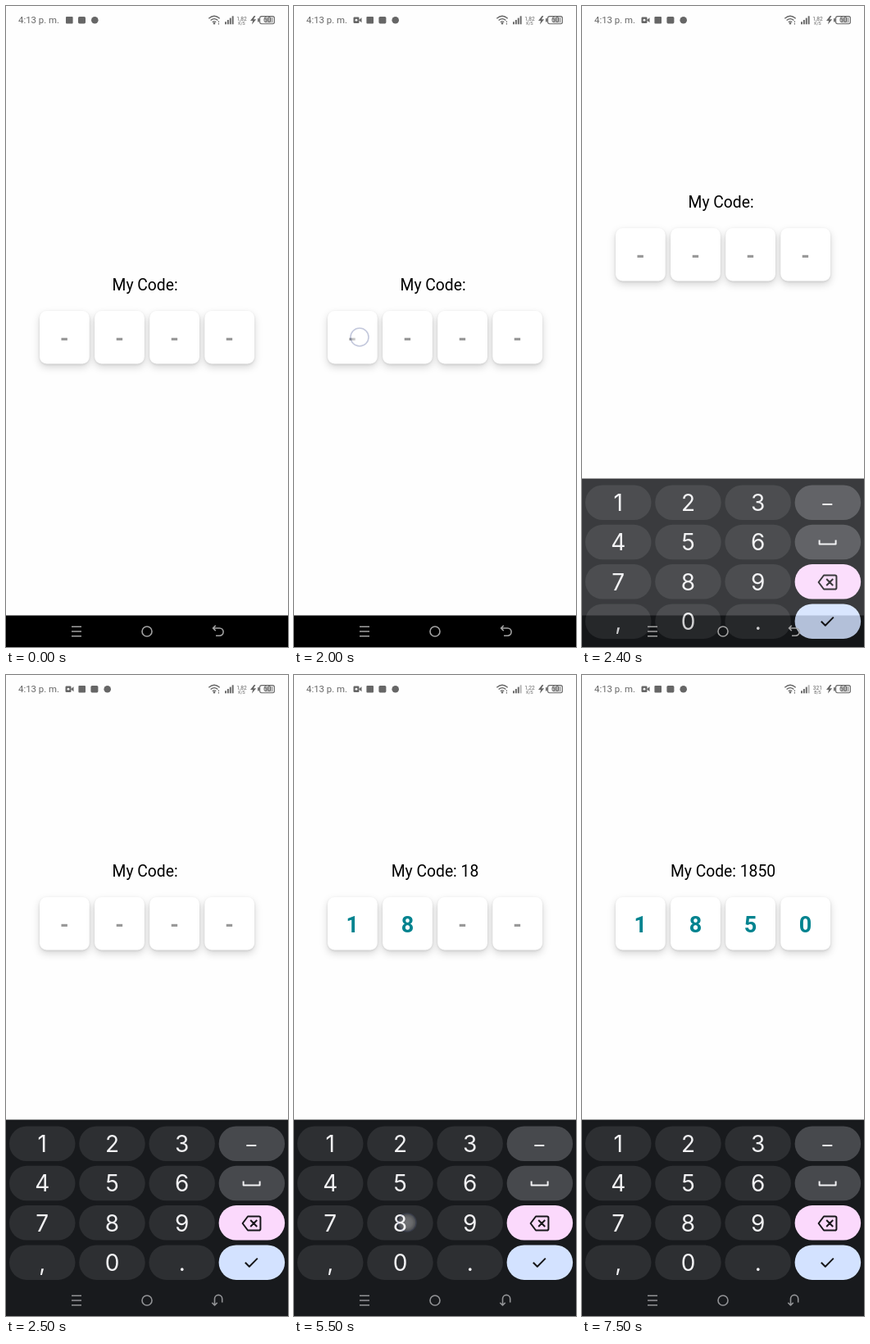
Write an HTML page that moves like this. It is 344 px wide and 782 px high and loops after 8 s.

```html
<!DOCTYPE html>
<html lang="es">
<head>
<meta charset="utf-8">
<title>My Code</title>
<style>
html, body { margin: 0; width: 100%; height: 100%; overflow: hidden; background: #fefefe; }
svg { display: block; width: 100%; height: 100%; }
text { font-family: Roboto, sans-serif; }
.mid { text-anchor: middle; }
.cell { fill: #fff; filter: drop-shadow(0 1px 1.5px rgba(0,0,0,.1)) drop-shadow(0 4px 5px rgba(0,0,0,.16)); }
.digit { font-size: 27px; font-weight: 700; }
.key { font: 400 28px Inter, sans-serif; fill: #f2f2f4; }
.line { fill: none; stroke-linejoin: round; }
</style>
</head>
<body>
<svg id="stage" viewBox="0 0 344 782">
  <defs>
    <radialGradient id="touch">
      <stop offset="0" stop-color="#fff" stop-opacity=".66"/>
      <stop offset=".6" stop-color="#fff" stop-opacity=".55"/>
      <stop offset="1" stop-color="#fff" stop-opacity=".3"/>
    </radialGradient>
  </defs>
  <rect width="344" height="782" fill="#fefefe"/>

  <g fill="#666">
    <text x="15" y="21.3" font-size="11.4">4:13 p. m.</text>
    <g id="camera">
      <rect x="72.5" y="13.5" width="7" height="7.5" rx="1.2"/>
      <path d="M79 17.2 82.5 14.3V20.2Z"/>
      <circle cx="76" cy="17.2" r="1.4" fill="#fefefe"/>
    </g>
    <g id="apps">
      <rect x="73" y="13" width="8.6" height="8.6" rx="1"/>
      <rect x="88" y="13" width="9" height="8.4" rx="1.6"/>
      <circle cx="108.3" cy="17.2" r="4.3"/>
    </g>
    <g class="line" stroke="#666" stroke-width="1.3">
      <path d="M247.3 15.2Q254 9.2 260.7 15.2M249.6 17.6Q254 13.6 258.4 17.6M251.8 19.8Q254 17.9 256.2 19.8"/>
    </g>
    <circle cx="254" cy="21.3" r="1.2"/>
    <path d="M258.8 18.6h1.2v1.4h-1.2zM258.8 21h1.2v1.4h-1.2z"/>
    <g id="signal"></g>
    <text id="speed" class="mid" x="287.4" y="17.6" font-size="6.6"></text>
    <text id="unit" class="mid" x="287.4" y="23" font-size="5.2"></text>
    <path d="M302.6 12 298 18h3l-1 4.6 5.2-6.4h-3.2l2.4-4.2z"/>
    <rect x="307" y="15" width="1.8" height="4.4" rx=".6"/>
    <rect x="309.6" y="12.6" width="17.8" height="9.2" rx="2.2" fill="none" stroke="#666" stroke-width="1.1"/>
    <rect x="316" y="14" width="10" height="6.4" rx="1" fill="#bbb"/>
    <text class="mid" x="318.8" y="20.4" font-size="8.4" font-weight="500">60</text>
  </g>

  <g id="form">
    <text id="label" class="mid" x="172" y="346.8" font-size="19.3"></text>
    <g id="cells"></g>
  </g>

  <rect y="743.5" width="344" height="38.5"/>
  <g id="board"></g>
  <g id="nav" class="line" stroke-width="1.6">
    <path d="M80 757.3h12M80 763h12M80 768.7h12"/>
    <circle cx="172" cy="763" r="6"/>
    <path id="back" d="M-2.5 5.2H2A4.6 4.6 0 0 0 2-4H-5.6M-2.8-7.2-6-4-2.8-.8"/>
  </g>
  <circle id="trace" cx="138" cy="620" r="10" fill="#fff" opacity=".045"/>
  <g id="tap">
    <circle r="10.5" fill="url(#touch)"/>
    <circle r="11" fill="none" stroke="#6a75a8" stroke-opacity=".4" stroke-width="1.6"/>
  </g>
</svg>
<script>
const LOOP = 8000, STEP = 100;
const PIN = [["1", 4600], ["8", 5400], ["5", 5800], ["0", 7100]];
const TAPS = [
  { x: 80, y: 404, from: 2000, fade: 2100, to: 2200 },
  { x: 64, y: 577.5, from: 4500, fade: 4600, to: 4700 },
  { x: 138, y: 668, from: 5300, fade: 5400, to: 5600 },
  { x: 138, y: 620, from: 5700, fade: 5900, to: 6000 },
  { x: 136, y: 715, from: 7000, fade: 7200, to: 7300 }
];
const $ = id => document.getElementById(id);

function add(parent, tag, attrs, text) {
  const el = document.createElementNS("http://www.w3.org/2000/svg", tag);
  for (const k in attrs) el.setAttribute(k, attrs[k]);
  if (text) el.textContent = text;
  return parent.appendChild(el);
}
const set = (id, name, value) => $(id).setAttribute(name, value);

const bars = [3, 5.3, 7.7, 10].map((h, i) =>
  add($("signal"), "rect", { x: 267 + i * 2.9, y: 22.3 - h, width: 1.9, height: h }));

const digits = PIN.map((_, i) => {
  const x = 41 + i * 67.1;
  add($("cells"), "rect", { class: "cell", x, y: 372, width: 60.8, height: 64.6, rx: 8.5 });
  return add($("cells"), "text", { class: "digit mid", x: x + 30.3, y: 415 });
});

function buildBoard() {
  const board = $("board");
  const faces = ["123", "456", "789", ",0."];
  const side = ["#47494d", "#47494d", "#fbd9fc", "#d3e2ff"];
  add(board, "rect", { y: 542.5, width: 344, height: 240, fill: "#181a1d" });
  for (let r = 0; r < 4; r++) {
    for (let c = 0; c < 4; c++) {
      const x = 4 + c * 85.2, y = 550.5 + r * 48.3;
      add(board, "rect", { x, y, width: 80.5, height: 42.5, rx: 21.2, fill: c < 3 ? "#2d2f32" : side[r] });
      if (c < 3) add(board, "text", { class: "key mid", x: x + 40.3, y: y + 31.5 }, faces[r][c]);
    }
  }
  const icon = (d, stroke, width) =>
    add(board, "path", { class: "line", d, stroke, "stroke-width": width });
  icon("M293.3 574h12", "#f2f2f4", 2);
  icon("M289.6 617.5v5h20v-5", "#f2f2f4", 2);
  icon("M295 660.5h13.6q1.8 0 1.8 1.8v13.4q0 1.8-1.8 1.8H295L288.6 669Z" +
       "M298.2 665l8 8M306.2 665l-8 8", "#17171a", 2);
  icon("M291.8 716.8l5 5 10-10.2", "#17171a", 2);
}
buildBoard();

function render(now) {
  const t = Math.floor((now % LOOP) / STEP) * STEP;

  // status bar
  const slide = t < 300 ? 0 : t < 400 ? .3 : t < 500 ? .8 : 1;
  set("apps", "transform", `translate(${15.4 * slide} 0)`);
  set("camera", "opacity", slide === 1 ? 1 : slide * .6);
  bars[3].setAttribute("fill", t < 3600 ? "#666" : "#b4b4b4");
  $("speed").textContent = t < 2600 ? "1,82" : t < 7500 ? "1,22" : "321";
  $("unit").textContent = t < 7500 ? "K/S" : "B/S";

  // code entry
  const code = PIN.filter(p => t >= p[1]).map(p => p[0]).join("");
  $("label").textContent = "My Code:\u00a0" + code;
  digits.forEach((el, i) => {
    el.textContent = code[i] || "-";
    el.setAttribute("fill", code[i] ? "#00838f" : "#999");
  });
  set("form", "transform", `translate(0 ${t < 2300 ? 0 : -101})`);

  // keyboard rises while it fades in
  const [drop, alpha] = t < 2300 ? [240, 0] : t < 2400 ? [132.5, .37] : t < 2500 ? [34, .85] : [0, 1];
  set("board", "transform", `translate(0 ${drop})`);
  set("board", "opacity", alpha);
  set("nav", "stroke", t < 2500 ? "#a2a2a2" : "#929396");
  set("back", "transform", `translate(258.5 763) rotate(${t < 2500 ? 0 : -90})`);

  // touches
  const tap = TAPS.find(p => t >= p.from && t < p.to);
  set("tap", "opacity", !tap ? 0 : t < tap.fade ? 1 : .5);
  if (tap) set("tap", "transform", `translate(${tap.x} ${tap.y})`);
  set("trace", "visibility", t >= 6000 && t < 7000 ? "visible" : "hidden");
}

let start;
function tick(now) {
  start ??= now;
  render(now - start);
  requestAnimationFrame(tick);
}
render(0);
requestAnimationFrame(tick);
</script>
</body>
</html>
```
